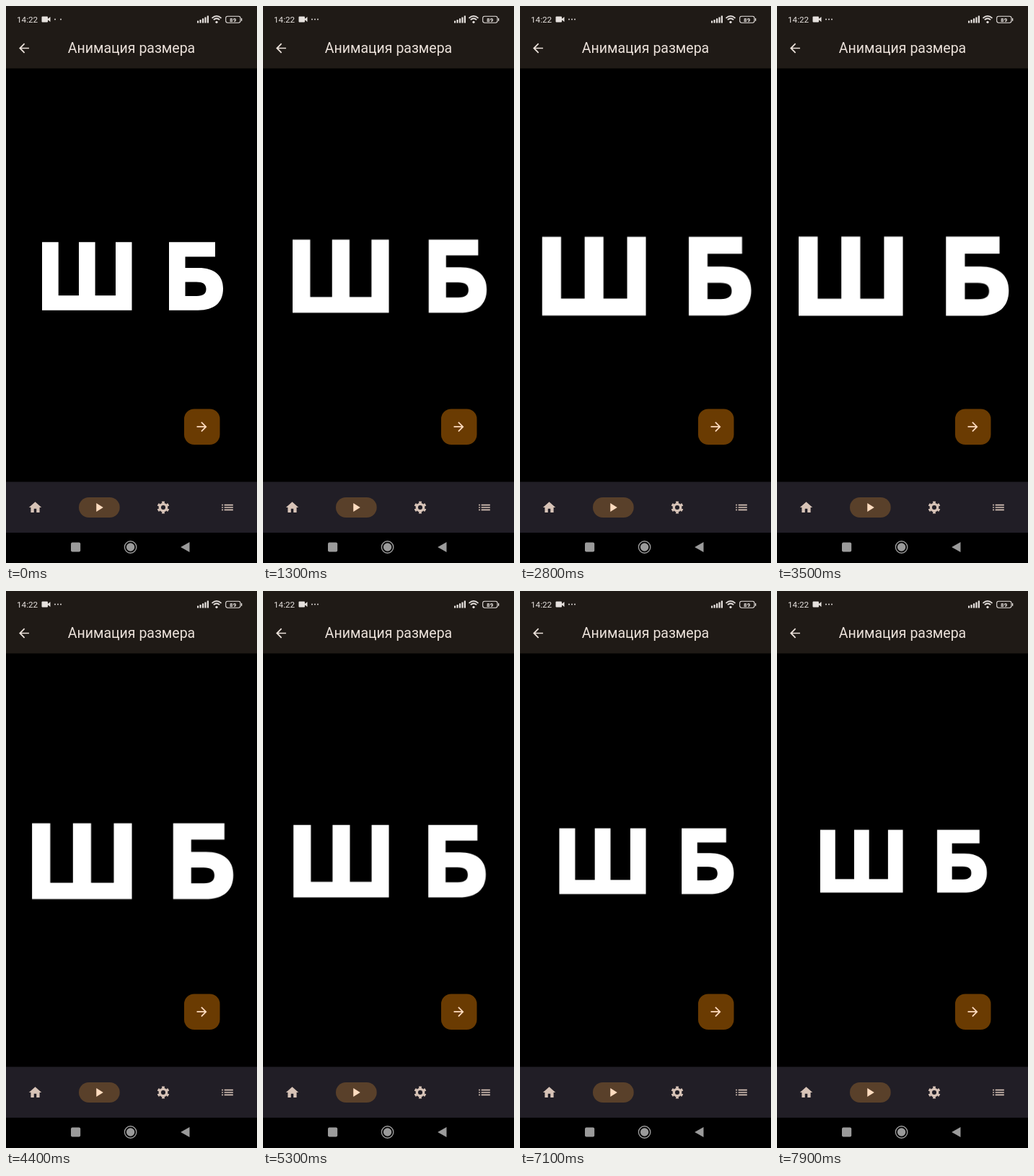
Animation, 348 px wide and 772 px high, one loop 8000 ms. Source, as an HTML page:

```html
<!DOCTYPE html>
<html lang="ru">
<head>
<meta charset="utf-8">
<title>Анимация размера</title>
<style>
  html, body { margin: 0; width: 100%; height: 100%; overflow: hidden; background: #000; }
  svg { display: block; width: 100vw; height: 100vh; }
  text { font-family: Roboto, "Noto Sans", sans-serif; }

  .status { fill: #e6e1de; }
  .line { fill: none; stroke: #e6e1de; }
  .title { font-size: 19.5px; fill: #ebe1da; text-anchor: middle; }
  .tab { fill: #d7c3b7; }
  .accent { fill: #ffdcc0; }
  .system { fill: #9b9b9b; }

  /* The picture refreshes ten times a second: 3.2 s growing, 4.8 s shrinking. */
  .letters {
    fill: #fff;
    transform-origin: 174.5px 374.5px;
    animation: resize 8s infinite;
  }
  @keyframes resize {
    0%   { transform: scale(1); animation-timing-function: steps(32); }
    40%  { transform: scale(1.177); animation-timing-function: steps(48); }
    100% { transform: scale(.915); }
  }

  .dot { animation: appear 8s step-end infinite; }
  @keyframes appear {
    0%    { opacity: 0; }
    1.25% { opacity: 1; }
  }
</style>
</head>
<body>
<svg viewBox="0 0 348 772" preserveAspectRatio="none">
  <defs>
    <path id="arrow" transform="scale(.87)" d="M8 -1H-4.17L1.42-6.59 0-8-8 0 0 8 1.41 6.59-4.17 1H8z"/>
    <path id="home" transform="scale(.87) translate(-12 -12)" d="M10 20v-6h4v6h5v-8h3L12 3 2 12h3v8z"/>
    <path id="play" transform="scale(.87) translate(-12 -12)" d="M8 5v14l11-7z"/>
    <path id="list" transform="scale(.87) translate(-12 -12)" d="M3 7h2v2H3zM3 11h2v2H3zM3 15h2v2H3zM7 7h14v2H7zM7 11h14v2H7zM7 15h14v2H7z"/>
    <g id="gear" fill="none" stroke="#d7c3b7">
      <circle r="4.7" stroke-width="3.3"/>
      <circle r="7.1" stroke-width="2.8" pathLength="12" stroke-dasharray="1 1" stroke-dashoffset="-.5"/>
    </g>
  </defs>

  <rect width="348" height="772"/>
  <rect width="348" height="86.5" fill="#1f1a16"/>

  <!-- status bar -->
  <g class="status">
    <text x="15" y="22.6" font-size="11.7">14:22</text>
    <rect x="49.5" y="14.5" width="8.5" height="8" rx="1"/>
    <path d="M58 17.7 61.5 15v7L58 19.300z"/>
    <circle cx="68" cy="18.500" r=".95"/>
    <circle class="dot" cx="72" cy="18.500" r=".95"/>
    <circle cx="76" cy="18.500" r=".95"/>
    <path d="M265 20.500h2.200v3h-2.200zM268.500 19h2.200v4.500h-2.200zM272 17.300h2.200v6.200h-2.200zM275.400 15.500h2.200v8h-2.200zM278.800 13.500h2.200v10h-2.200z"/>
    <circle cx="292" cy="22.300" r="1.600"/>
    <rect x="326" y="16.800" width="1.300" height="4" rx=".6"/>
    <text x="314.700" y="21.700" font-size="8" font-weight="700" text-anchor="middle">89</text>
  </g>
  <g class="line">
    <path stroke-width="1.700" d="M285.500 16.800Q292 10.800 298.500 16.800M287.800 19.200Q292 15.300 296.200 19.200"/>
    <rect x="304.700" y="14.200" width="20.300" height="9" rx="2.600" stroke-width="1.100"/>
  </g>

  <!-- app bar -->
  <use href="#arrow" x="25" y="58.500" fill="#ebe1da"/>
  <text class="title" x="174" y="65.300">Анимация размера</text>

  <g class="letters" role="img" aria-label="Ш Б">
    <path d="M50 327.200H72.700V401.300H101V327.200H123.600V401.300H152V327.200H174.500V421.700H50z"/>
    <path fill-rule="evenodd" d="M226 327.200H290V347.500H248.500V363H267C289 363 301 373.500 301 391.500C301 411 289 421.700 266 421.700H226z
      M248.500 382.500V402H264.500C273.500 402 277.500 398.800 277.500 392.300C277.500 385.500 273 382.500 264 382.500z"/>
  </g>

  <rect x="247" y="558.500" width="49.500" height="49.500" rx="14" fill="#6a3b02"/>
  <use href="#arrow" class="accent" transform="translate(271.500 583.200) scale(-1 1)"/>

  <!-- tabs -->
  <rect y="659.500" width="348" height="70.500" fill="#211e26"/>
  <rect x="101" y="681" width="56.700" height="28" rx="14" fill="#59402a"/>
  <g class="tab">
    <use href="#home" x="40.500" y="695"/>
    <use href="#play" class="accent" x="128.700" y="695"/>
    <use href="#gear" x="218" y="695"/>
    <use href="#list" x="307" y="695"/>
  </g>

  <!-- system buttons -->
  <g class="system">
    <rect x="90" y="743.500" width="13.200" height="13" rx="2"/>
    <circle cx="172.600" cy="750" r="5.700"/>
    <circle cx="172.600" cy="750" r="8.200" fill="none" stroke="#9b9b9b" stroke-width="1.400"/>
    <path d="M242.200 750 254.500 743V757z"/>
  </g>
</svg>
</body>
</html>
```
